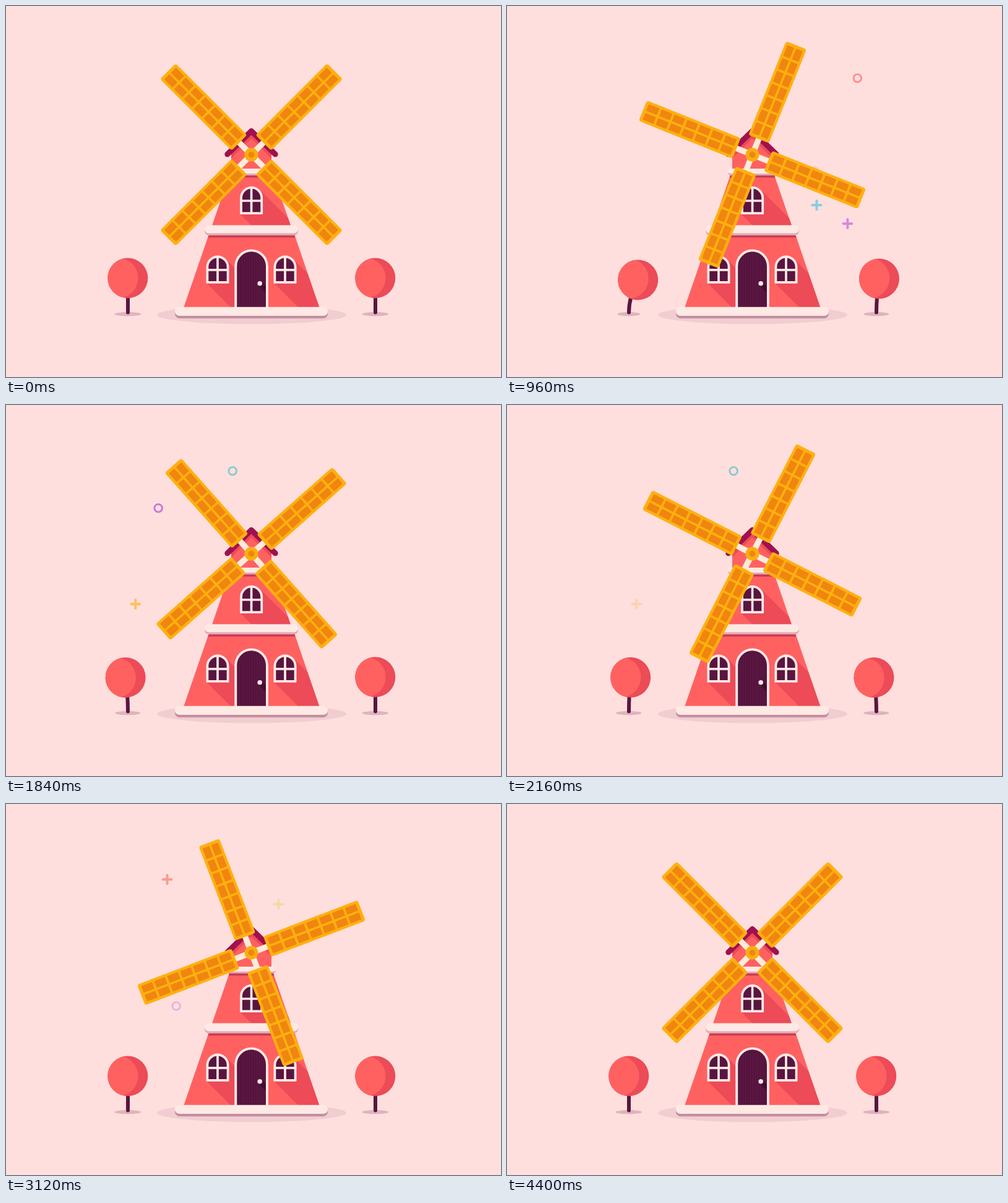
Write an HTML page that moves like this. It is 800 by 600 pixels and loops after 4800 ms.

```html
<!DOCTYPE html>
<html lang="en">
<head>
<meta charset="utf-8">
<title>Windmill</title>
<style>
html, body { margin: 0; width: 100%; height: 100%; overflow: hidden; background: #fedfdd; }
svg { display: block; width: 800px; height: 600px; }
.red { fill: #ff6161; }
.shade { fill: #ec4b57; }
.cream { fill: #ffe9e5; }
.plum { fill: #591540; }
.strip { fill: #c83c56; }
.gold { fill: #ffb00f; }
.amber { fill: #f08510; }
</style>
</head>
<body>
<svg viewBox="0 0 800 600" xmlns="http://www.w3.org/2000/svg">
  <defs>
    <clipPath id="crown"><circle r="32.5"/></clipPath>
    <clipPath id="head"><path d="M364 264V234L396.5 202L429 234V264Z"/></clipPath>
    <pattern id="boards" width="4" height="8" patternUnits="userSpaceOnUse">
      <rect width="4" height="8" fill="#5a1641"/>
      <rect x="3" width="1" height="8" fill="#4e1139"/>
    </pattern>
    <g id="window">
      <path class="cream" d="M-18.5 44V18.5a18.5 18.5 0 0 1 37 0V44q0 1.2-1.2 1.2H-17.3q-1.2 0-1.2-1.2Z"/>
      <path class="plum" d="M-14.7 41.4V18.5a14.7 14.7 0 0 1 29.4 0V41.4Z"/>
      <path d="M0 2V43M-16 23.2H16" stroke="#ffe9e5" stroke-width="3.7"/>
    </g>
  </defs>

  <rect width="800" height="600" fill="#fedfdd"/>
  <g id="sparks" fill="none"></g>
  <ellipse cx="397" cy="499.5" rx="153" ry="15" fill="#f1cdd1"/>
  <g id="trees"></g>

  <!-- lower floor -->
  <path class="red" d="M328 369H466L506.5 488H287Z"/>
  <path class="shade" d="M433 448L472 487H506.3L487.4 432.4L464 409Z"/>
  <path class="shade" d="M324 448L363 487H372V426L355 409Z"/>
  <path class="strip" d="M328 370H466L467.5 374.6H326.6Z"/>
  <use href="#window" x="342" y="403.6"/>
  <use href="#window" x="451" y="403.6"/>
  <path class="cream" d="M369.3 488V420.7a27.3 27.3 0 0 1 54.6 0V488Z"/>
  <path fill="url(#boards)" d="M373.2 487V420.7a23.4 23.4 0 0 1 46.8 0V487Z"/>
  <path fill="#420d33" d="M407.4 451.6L420 464.2V453.4L412.8 446.2Z"/>
  <circle class="cream" cx="410.2" cy="448.8" r="3.8"/>
  <rect x="273" y="490" width="247" height="15.3" rx="7.6" fill="#c48fa1"/>
  <rect class="cream" x="273" y="486.7" width="247" height="14.4" rx="7"/>

  <!-- upper floor -->
  <path class="red" d="M361.5 272H431.5L460 355H333Z"/>
  <path class="shade" d="M379 337L397 355H460L456 343L410 297Z"/>
  <path class="strip" d="M361 273H432L433.4 277.6H359.6Z"/>
  <use href="#window" x="396.6" y="291.8"/>
  <rect x="321" y="357" width="151" height="14" rx="7" fill="#e3a8b1"/>
  <rect class="cream" x="321" y="354.6" width="151" height="12.8" rx="6.3"/>

  <!-- head -->
  <path class="red" d="M364 264V234L396.5 202L429 234V264Z"/>
  <path clip-path="url(#head)" d="M352 252L396.5 208L441 252" fill="none" stroke="#ec4b57" stroke-width="9"/>
  <path d="M357.8 239.8L396.5 202.3L435.2 239.8" fill="none" stroke="#a0104f" stroke-width="9" stroke-linecap="round" stroke-linejoin="round"/>
  <rect x="357.3" y="265" width="78.5" height="9" rx="4.5" fill="#e3a8b1"/>
  <rect class="cream" x="357.3" y="263" width="78.5" height="8" rx="4"/>

  <g transform="translate(396.5 240.5)">
    <g id="sails"></g>
    <circle r="11" fill="#f9ae10"/>
    <circle class="amber" r="5"/>
  </g>
</svg>
<script>
const LOOP = 4800, STEP = 40;
const $ = id => document.getElementById(id);

function add(parent, tag, attrs) {
  const el = document.createElementNS("http://www.w3.org/2000/svg", tag);
  for (const k in attrs) el.setAttribute(k, attrs[k]);
  return parent.appendChild(el);
}

// [time, value] knots joined by a smooth curve that rests at both ends
const SPIN = [[120, 0], [680, 7.1], [960, 23.1], [1240, 42.8], [1520, 63.6], [1840, 86.6],
  [2480, 126.8], [2920, 148], [3120, 156], [3480, 167.6], [3760, 174], [4040, 177.8], [4400, 180]];
const SWAY = [[500, 0], [620, 4.7], [900, 13.3], [1010, 15.8], [1240, 10.5], [1500, 0],
  [1820, -3.8], [2140, 2.8], [2480, 0]];

function curve(knots, t) {
  const last = knots.length - 1;
  if (t <= knots[0][0]) return knots[0][1];
  if (t >= knots[last][0]) return knots[last][1];
  const gap = i => knots[i + 1][0] - knots[i][0];
  const rise = i => (knots[i + 1][1] - knots[i][1]) / gap(i);
  const slope = i => i === 0 || i === last ? 0 :
    (gap(i - 1) * rise(i) + gap(i) * rise(i - 1)) / (gap(i - 1) + gap(i));
  let i = 0;
  while (t > knots[i + 1][0]) i++;
  const h = gap(i), u = (t - knots[i][0]) / h, v = 1 - u;
  return knots[i][1] * v * v * (1 + 2 * u) + knots[i + 1][1] * u * u * (3 - 2 * u)
    + h * u * v * (slope(i) * v - slope(i + 1) * u);
}

// sails
for (let a = 0; a < 4; a++) {
  const arm = add($("sails"), "g", { transform: `rotate(${a * 90})` });
  add(arm, "rect", { x: -4.7, y: -34, width: 9.4, height: 34, fill: "#ffebd9" });
}
for (let a = 0; a < 4; a++) {
  const arm = add($("sails"), "g", { transform: `rotate(${a * 90})` });
  add(arm, "rect", { class: "gold", x: -17.8, y: -190.8, width: 35.6, height: 163.4, rx: 4 });
  for (let r = 0; r < 7; r++)
    for (const x of [-13.4, 1.8])
      add(arm, "rect", { class: "amber", x, y: -185.6 + r * 22.4, width: 11.6, height: 18.6 });
}

// trees: the right one sways later
const trees = [[197, 0], [597, 340]].map(([x, delay]) => ({
  x, delay,
  shadow: add($("trees"), "ellipse", { cx: x - 0.2, cy: 498.3, ry: 3.2, fill: "#dfb3bd" }),
  trunk: add($("trees"), "path", { fill: "none", stroke: "#591540", "stroke-width": 6, "stroke-linecap": "round" }),
  crown: add($("trees"), "g", {})
}));
for (const { crown } of trees) {
  add(crown, "circle", { class: "shade", r: 32.5 });
  add(crown, "circle", { class: "red", r: 32.5, cx: -15.7, "clip-path": "url(#crown)" });
}

// shape, x, y, colour, start, end
const sparks = [
  ["ring", 566.3, 116.7, "#ff8d8d", 600, 1560],
  ["plus", 500.5, 322, "#85cfdf", 700, 1640],
  ["plus", 550.4, 352, "#d78ae0", 720, 1680],
  ["ring", 497, 267, "#f59a88", 900, 1840],
  ["plus", 209.3, 322, "#ffbf5a", 1360, 2320],
  ["ring", 246.2, 166.8, "#c878d8", 1480, 2440],
  ["ring", 366.2, 106.7, "#8acbcf", 1640, 2840],
  ["plus", 440.5, 162, "#dcd145", 2200, 3270],
  ["ring", 275.2, 326.7, "#e08fde", 2240, 3360],
  ["plus", 260.5, 122, "#f5a08c", 2960, 4080]
].map(([kind, x, y, stroke, from, to]) => {
  const look = { stroke, transform: `translate(${x} ${y})`, "stroke-linecap": "round" };
  const el = kind === "ring"
    ? add($("sparks"), "circle", { ...look, r: 6.3, "stroke-width": 2.9 })
    : add($("sparks"), "path", { ...look, d: "M-7 0H7M0-7V7", "stroke-width": 4 });
  return { el, from, to };
});

function draw(t) {
  $("sails").setAttribute("transform", `rotate(${45 - curve(SPIN, t)})`);
  for (const { x, delay, shadow, trunk, crown } of trees) {
    const dx = curve(SWAY, t - delay), bend = Math.abs(dx);
    const cy = 440 + bend * 0.2;
    shadow.setAttribute("rx", 21.4 - bend * 0.2);
    trunk.setAttribute("d", `M${x} 495.5Q${x} 470 ${x + dx} ${cy}`);
    crown.setAttribute("transform", `translate(${x + dx - 0.2} ${cy}) rotate(${dx * 0.5})`);
  }
  for (const { el, from, to } of sparks) {
    const fade = Math.min((t - from) / 160, (to - t) / 420, 1);
    el.setAttribute("opacity", Math.max(0, fade));
  }
}

function tick() {
  const t = performance.now() % LOOP;
  draw(Math.floor(t / STEP) * STEP);
  requestAnimationFrame(tick);
}
tick();
</script>
</body>
</html>
```
